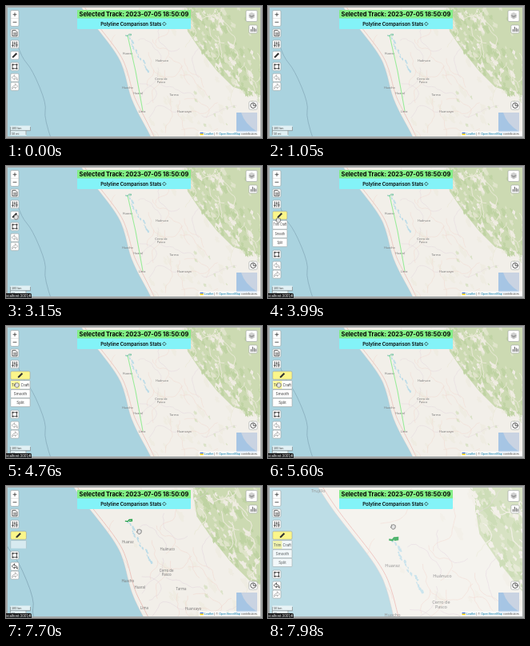
These frames come from a looping animation (320x166 px, 8000 ms). An HTML page:

```html
<!DOCTYPE html>
<html lang="en">
<head>
<meta charset="utf-8">
<title>Track editor</title>
<style>
html, body { margin: 0; width: 100%; height: 100%; overflow: hidden; background: #aad3df; }
svg { display: block; width: 100vw; height: 100vh; font-family: Inter, "Liberation Sans", sans-serif; }
.btn { fill: #fff; stroke: #9b9f9f; stroke-width: .6; }
.ico { fill: none; stroke: #333; stroke-width: .8; stroke-linecap: round; stroke-linejoin: round; }
.place { font: 3.8px "Noto Sans", sans-serif; fill: #777; text-anchor: middle; }
.menu { font-size: 4.5px; fill: #333; text-anchor: middle; opacity: var(--ink); }
.small { font: 3.8px "Liberation Sans", Arial, sans-serif; fill: #444; }
</style>
</head>
<body>
<svg viewBox="0 0 320 166" preserveAspectRatio="none">
  <defs>
    <clipPath id="panelClip"><rect id="panelArea" x="5" y="56" width="26"/></clipPath>
    <clipPath id="landClip"><path id="landShape"/></clipPath>
  </defs>
  <rect width="320" height="166" fill="#aad3df"/>
  <g id="map">
    <path id="land" fill="#f2efe9" stroke="#c9bfc4" stroke-width=".3"/>
    <g id="terrain" clip-path="url(#landClip)"></g>
    <path d="M15 50Q19 64 26 72T42 102 49 132 58 172" fill="none" stroke="#7fa3b3" stroke-width=".65"/>
    <g id="places"></g>
    <path id="track" d="M152 37L162 82 171 132" fill="none" stroke="#98ec98" stroke-width="1.1"/>
    <path id="piece" d="M149 37l3 .5 1.500-2 3-.2 0 1.500-3 .5" fill="none"/>
  </g>
  <rect id="fade" width="320" height="166" fill="#fff"/>

  <g text-anchor="middle" font-size="7.400" font-weight="700">
    <rect x="89" y="5" width="142" height="24" rx="1" fill="#83f3f8"/>
    <rect x="89" y="5" width="142" height="10.500" fill="#83ee86"/>
    <text x="160" y="13.200">Selected Track: 2023-07-05 18:50:09</text>
    <text x="156.300" y="24.600" font-size="6" font-weight="600">Polyline Comparison Stats</text>
    <path d="M197.800 20.200l2.200 2.300-2.200 2.300-2.200-2.300z" fill="none" stroke="#111" stroke-width=".7"/>
  </g>

  <g id="tools">
    <rect class="btn" x="5.800" y="5.500" width="10.200" height="20" rx="1.500"/>
    <path d="M6 15.500h10" stroke="#ccc" stroke-width=".5"/>
    <path class="ico" d="M9 10.700h4m-2-2v4M9 20.300h4"/>
    <rect class="btn" x="5.800" y="29" width="10.200" height="10.200" rx="1.500"/>
    <path class="ico" d="M8.300 30.700h3.700l2 2v5H8.300zM9.700 34h3m-3 1.800h3"/>
    <rect class="btn" x="5.800" y="43" width="10.200" height="10.200" rx="1.500"/>
    <path class="ico" d="M8.500 45v6.500M11 45v6.500M13.500 45v6.500M7.700 49.500h1.600M10.200 47h1.600M12.700 49h1.600"/>
  </g>

  <g clip-path="url(#panelClip)">
    <g id="rows">
      <rect class="btn" y="68.500" width="24.300" height="11" rx="1"/>
      <rect id="trimHot" x=".4" y="69" width="11.300" height="10" fill="#fdf9a0"/>
      <rect id="sideHot" x="12" y="69" width="12" height="10" fill="#e6e6e6"/>
      <text class="menu" x="6" y="75.500">Trim</text>
      <text class="menu" x="17.900" y="75.500">Craft</text>
      <rect class="btn" y="80" width="24.300" height="10.500" rx="1"/>
      <text class="menu" x="12.200" y="86.900">Smooth</text>
      <rect class="btn" y="91" width="24.300" height="10.500" rx="1"/>
      <text class="menu" x="12.200" y="97.900">Split</text>
    </g>
  </g>
  <rect id="penBtn" class="btn" x="5.800" y="57" height="10.200" rx="1.500"/>
  <path id="pen" d="M-3.200 3.200l.5-2L1.700-3.200 3.200-1.700-1.200 2.700z" fill="#333"/>

  <g id="lower">
    <rect class="btn" x="5.800" y="71" width="10.200" height="10.200" rx="1.500"/>
    <path class="ico" d="M8.500 73.700h5v5h-5z"/>
    <path d="M8.500 73.700h5v5h-5z" fill="none" stroke="#333" stroke-width="1.800" stroke-dasharray="1.600 3.400" stroke-dashoffset=".8"/>
    <rect class="btn" x="5.800" y="85" width="10.200" height="10.200" rx="1.500"/>
    <rect class="btn" x="5.800" y="96" width="10.200" height="10.200" rx="1.500"/>
    <path id="undo" class="ico" d="M10.500 87l-3.200 2.900 3.200 2.900v-1.800q3 0 3.700 2.300 .4-4.300-3.700-4.500z"/>
    <path class="ico" style="stroke:#a5a5a5" d="M11.500 98l3.200 2.900-3.200 2.900V102q-3 0-3.700 2.300-.4-4.300 3.700-4.500z"/>
  </g>

  <g id="right">
    <rect class="btn" x="300" y="5.500" width="14" height="14" rx="1.500"/>
    <path d="M303 14l4-2 4.500 2-4.500 2.500z" fill="#c4c4c4"/>
    <path d="M303 12l4-2 4.500 2-4.500 2.500z" fill="#999"/>
    <path d="M303 10l4-2 4.500 2-4.500 2.500z" fill="#d0d0d0"/>
    <rect class="btn" x="303.800" y="24" width="10.200" height="10.200" rx="1.500"/>
    <path class="ico" d="M306.300 32v-2.500M308.300 32v-5.500M310.300 32v-4M312.200 32v-3"/>
    <rect class="btn" x="303.800" y="120" width="10.200" height="10.200" rx="1.500"/>
    <circle class="ico" cx="309" cy="125.100" r="3.300"/>
    <path class="ico" d="M309 122.800v2.400h2"/>
    <rect x="288" y="134" width="26" height="26" fill="#a6c5e4"/>
    <path d="M294 134Q298 148 314 158V134z" fill="#c9d3e2"/>
    <rect x="241" y="157.500" width="76.500" height="6" fill="#fff" opacity=".75"/>
    <path d="M242.500 159h4.300v1.600h-4.300z" fill="#4c7be1"/>
    <path d="M242.500 160.600h4.300v1.600h-4.300z" fill="#ffd500"/>
    <text class="small" x="247.800" y="162"><tspan fill="#0078a8">Leaflet</tspan> | © <tspan fill="#0078a8">OpenStreetMap</tspan> contributors</text>
  </g>

  <g id="scale">
    <path d="M5.500 150.500h25v6h-25zM5.500 157h20v6h-20z" fill="#fff" opacity=".65"/>
    <path d="M5.500 152v4.700h25V152M5.500 162v-5.300M25 162v-5.300" fill="none" stroke="#777" stroke-width=".6"/>
    <text id="km" class="small" x="7" y="155.200"></text>
    <text id="mi" class="small" x="7" y="161.600"></text>
  </g>
  <rect x="1" y="1" width="318" height="164" fill="none" stroke="#a5a8a8" stroke-width="2"/>
  <g id="status">
    <path d="M0 160h30q2 0 2 2v4H0z" fill="#1c1d1e"/>
    <text x="-1.500" y="164.700" font-size="4.200" fill="#eee">localhost:3001/#</text>
  </g>
  <path id="cursor" d="M-1.700 .4V-2q.7-1 1.300 0 .7-1 1.300 0 .8-.7 1.300 .2 .8-.3 1 .6V1q-.4 2-2 2.200h-1.400Q-2 2.300-2.700 .5z" fill="#e4e4e4" stroke="#444" stroke-width=".6"/>
</svg>
<script>
const $ = id => document.getElementById(id);
const set = (id, o) => { for (const k in o) $(id).setAttribute(k, o[k]); };
const show = (id, on) => set(id, { visibility: on ? 'visible' : 'hidden' });
const add = (id, tag, o, text = '') => {
  const e = document.createElementNS('http://www.w3.org/2000/svg', tag);
  for (const k in o) e.setAttribute(k, o[k]);
  e.textContent = text;
  $(id).append(e);
};
let seed = 11;
const rnd = () => (seed = (seed * 16807) % 2147483647) / 2147483647;
const between = (a, b) => a + (b - a) * rnd();

// Map
const shore = 'M68-40L92-2C108 24 136 52 144 72S151 104 160 124 176 152 188 180';
set('land', { d: shore + 'H380V-40z' });
set('landShape', { d: shore + 'H380V-40z' });

// Ragged patch, stretched along the mountain range
function patch(x, y, r, fill) {
  const pts = [];
  for (let a = 0; a < 6.2; a += .5) {
    const q = r * between(.4, 1.2), u = Math.cos(a) * q * .7, v = Math.sin(a) * q * 1.3;
    pts.push([x + u + v * .5, y + v - u * .4].map(n => n.toFixed(1)));
  }
  add('terrain', 'path', { d: 'M' + pts.join('L') + 'z', fill });
}
function road(d, stroke, width) {
  add('terrain', 'path', { d, stroke, fill: 'none', 'stroke-width': width });
}
function wander(x, y, angle, n) {
  let d = `M${x} ${y}`;
  for (let i = 0; i < n; i++) {
    angle += between(-.7, .7);
    x += Math.cos(angle) * 4;
    y += Math.sin(angle) * 4;
    d += `L${x.toFixed(1)} ${y.toFixed(1)}`;
  }
  return d;
}
const edge = y => 221 + y * .2 + y * y * .0045;
for (let i = 0; i < 45; i++) {
  const y = between(0, 166);
  patch(between(125 + y * .35, 300), y, between(2, 6), '#efece2');
}
add('terrain', 'path', { d: 'M217-40L222 0 227 32 244 57 264 82 284 102 330 116V-40z', fill: '#ccdab2' });
for (let i = 0; i < 170; i++) {
  const y = between(-8, 112);
  patch(edge(y) + between(-3, 1) + 95 * rnd() * rnd(), y, between(1.5, 5), i % 2 ? '#bfd3a3' : i % 4 ? '#dfe4ca' : '#efece2');
}
for (let i = 0; i < 24; i++) {
  const y = between(0, 100);
  road(wander(edge(y) + between(0, 80), y, between(.6, 1.6), 8), '#eceadb', .9);
}
for (let i = 0; i < 14; i++) patch(between(235, 320), between(105, 150), between(1, 3), '#dbe3c8');
road('M72-40L96-2C112 24 140 52 148 72S155 104 164 122 180 152 192 180', '#e8b0aa', .6);
for (let i = 0; i < 26; i++) {
  const y = between(0, 160);
  road(wander(between(115 + y * .4, 250), y, between(-2, 2), 12), i % 3 ? '#f0d2c8' : '#dfcfd9', .4);
}
for (let i = 0; i < 18; i++) patch(150 + i * 1.5 + between(0, 5), 38 + i * 2.6, between(.8, 2), '#bcdce8');

[['Trujillo', 88, -4], ['Huaraz', 152, 61], ['Huánuco', 195, 69.5], ['Cerro de', 194, 92.5], ['Pasco', 194, 97], ['Huacho', 152, 103.5],
 ['Huaral', 165, 110.5], ['Lima', 170, 133.5], ['Tarma', 210, 113], ['Huancayo', 223, 134]]
  .forEach(([name, x, y]) => add('places', 'text', { x, y, class: 'place' }, name));

// Motion
const ramp = (t, a, b) => Math.min(1, Math.max(0, (t - a) / (b - a)));
const CLICK = 3850, CUT = 7560, END = 7980;
const moves = [ // start, end, x, y
  [1610, 2100, 18, 58], [2380, 2660, 12, 64], [CLICK, 4200, 13, 74],
  [5740, 6510, 23, 76], [7490, 7670, 166, 57], [7770, END, 156, 51]];

function pointer(t) {
  let x = 62, y = 48;
  for (const [a, b, nx, ny] of moves) {
    const k = ramp(t, a, b);
    x += (nx - x) * k;
    y += (ny - y) * k;
  }
  return `translate(${x} ${y})`;
}

function draw(t) {
  const cut = t >= CUT, near = t >= 7910, open = t > CLICK;
  const k = ramp(t, CUT, END);
  set('map', { transform: `translate(${153 + 4 * k * k} ${36 + 30 * k ** 1.33}) scale(${1 + .45 * k}) translate(-153 -36)` });
  show('track', !cut);
  set('piece', { stroke: cut ? '#1f9f45' : '#62bd98', 'stroke-width': .8 + k * .8 });
  set('fade', { opacity: .22 * ramp(t, 7770, END) });

  const grow = cut ? ramp(t, CUT, 7770) : ramp(t, CLICK, 4100);
  const w = 10.2 + 14.1 * grow;
  const drop = !open ? 0 : cut && t < 7840 ? 11 : 35;
  set('panelArea', { height: open ? 11.5 + drop : 0 });
  set('rows', {
    transform: `translate(5.8 0) scale(${w / 24.3} 1)`,
    opacity: cut ? .4 + .4 * k : 1,
    style: `--ink:${cut ? ramp(t, 7700, END) : 1}`
  });
  show('trimHot', t >= 4200 && (!cut || near));
  show('sideHot', t > 6300 && !cut);
  set('penBtn', { width: w, style: 'fill:' + (open ? '#fbf68a' : '#fff') });
  set('pen', { transform: `translate(${5.8 + w / 2} 62)` });
  set('lower', { transform: `translate(0 ${drop})` });
  set('undo', { style: 'stroke:' + (cut ? '#333' : '#a5a5a5') });

  $('km').textContent = near ? '50 km' : '100 km';
  $('mi').textContent = near ? '30 mi' : '50 mi';
  show('status', t >= 2450);
  show('cursor', t >= 1610);
  set('cursor', { transform: pointer(t) });
}
function tick(now) {
  draw(Math.floor((now % 8000) / 70) * 70);
  requestAnimationFrame(tick);
}
draw(0);
requestAnimationFrame(tick);
</script>
</body>
</html>
```
